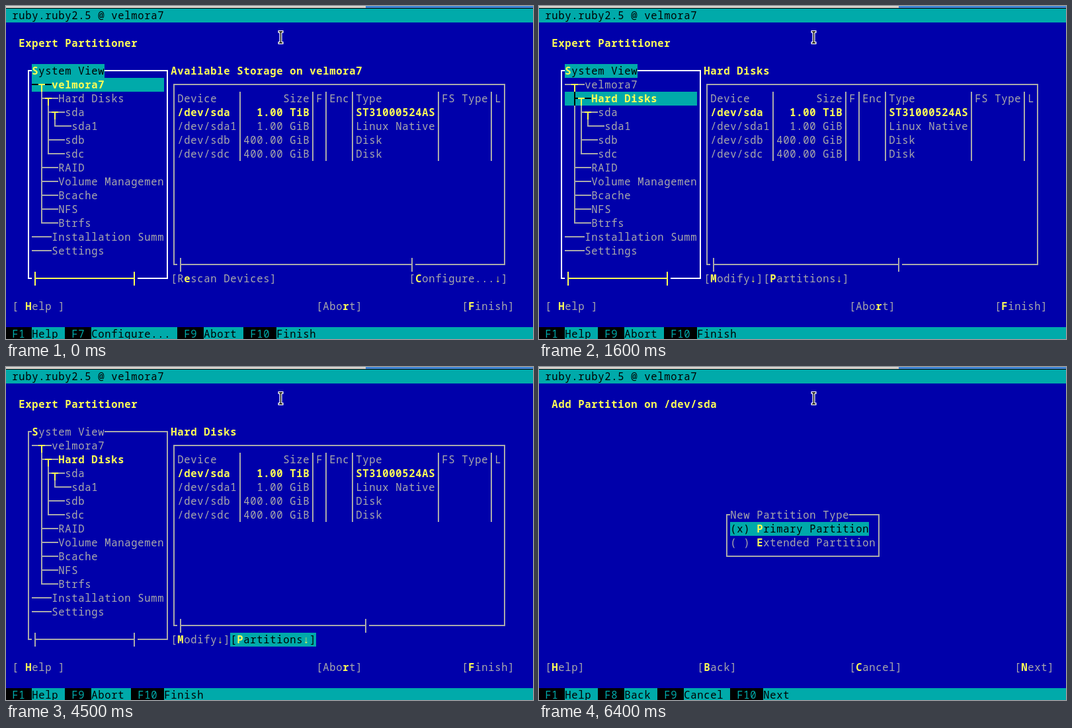
An HTML page with a canvas that plays this animation: 797x505 px, repeating every 8 s.

```html
<!DOCTYPE html>
<html lang="en">
<head>
<meta charset="utf-8">
<title>Partitioner</title>
<style>
  html, body { margin: 0; height: 100%; overflow: hidden; background: #0000aa; }
  canvas { display: block; }
</style>
</head>
<body>
<canvas id="screen" width="797" height="505"></canvas>
<script>
const ctx = document.getElementById('screen').getContext('2d');
const BLUE = '#0000aa', CYAN = '#00aaaa', GRAY = '#aaaaaa';
const YELLOW = '#ffff55', WHITE = '#ffffff', BLACK = '#000000';
const CELL_W = 10, CELL_H = 21, LOOP = 8000;
const FONT = '15.5px "Noto Sans Mono", monospace';
const HOST = 'velmora7';

// Arms of each line-drawing character: left, right, up, down
const ARMS = {
  '─': 'lr', '│': 'ud', '┌': 'rd', '┐': 'ld', '└': 'ru', '┘': 'lu',
  '├': 'rud', '┤': 'lud', '┬': 'lrd'
};

const colX = col => col * CELL_W - 1;
const rowY = row => row * CELL_H + 4;

function fill(col, row, cols, rows, color) {
  ctx.fillStyle = color;
  ctx.fillRect(colX(col), rowY(row), cols * CELL_W, rows * CELL_H);
}

function lineChar(col, row, char) {
  const x = colX(col), y = rowY(row);
  for (const arm of ARMS[char]) {
    if (arm === 'l') ctx.fillRect(x, y + 9, 6, 2);
    if (arm === 'r') ctx.fillRect(x + 4, y + 9, 6, 2);
    if (arm === 'u') ctx.fillRect(x + 4, y, 2, 11);
    if (arm === 'd') ctx.fillRect(x + 4, y + 9, 2, 12);
  }
}

// Writes text on the grid; parts in {braces} are bold yellow
function put(col, row, text, color = GRAY, back) {
  if (back) fill(col, row, text.replace(/[{}]/g, '').length, 1, back);
  text.split(/[{}]/).forEach((part, i) => {
    const bold = i % 2 === 1;
    ctx.fillStyle = bold ? YELLOW : color;
    ctx.font = (bold ? 'bold ' : '') + FONT;
    ctx.letterSpacing = '0px';
    const gap = CELL_W - ctx.measureText('0').width;
    ctx.letterSpacing = gap + 'px';
    for (const [run] of part.matchAll(/[─-┼]|[^─-┼]+/g)) {
      if (ARMS[run]) lineChar(col, row, run);
      else ctx.fillText(run, colX(col) + gap / 2, rowY(row) + 16);
      col += run.length;
    }
  });
}

function frame(c1, r1, c2, r2, color, skip = 0) {
  const width = c2 - c1 - 1;
  put(c1, r1, '┌' + ' '.repeat(skip) + '─'.repeat(width - skip) + '┐', color);
  for (let r = r1 + 1; r < r2; r++) {
    put(c1, r, '│', color);
    put(c2, r, '│', color);
  }
  put(c1, r2, '└', color);
  put(c2, r2, '┘', color);
}

// Bottom edge of a pane with its horizontal scroll bar
function scrollEdge(c1, c2, row, end, focused) {
  const bar = '├' + '─'.repeat(end - c1 - 2) + '┤';
  put(c1 + 1, row, bar, focused ? YELLOW : GRAY);
  put(end + 1, row, '─'.repeat(c2 - end - 1), focused ? WHITE : GRAY);
}

const TREE = [
  ['─{┬}─', HOST], [' ├{┬}─', 'Hard Disks'], [' │├{┬}─', 'sda'],
  [' ││└──', 'sda1'], [' │├──', 'sdb'], [' │└──', 'sdc'],
  [' ├──', 'RAID'], [' ├──', 'Volume Managemen'], [' ├──', 'Bcache'],
  [' ├──', 'NFS'], [' └──', 'Btrfs'],
  ['───', 'Installation Summ'], ['───', 'Settings']
];

function drawTree(selected, focused) {
  frame(3, 4, 24, 19, focused ? WHITE : GRAY, 11);
  scrollEdge(3, 24, 19, 19, focused);
  put(4, 4, '{S}ystem View', focused ? BLACK : GRAY, focused && CYAN);
  TREE.forEach(([branch, name], i) => {
    const current = i === selected, lit = current && focused;
    if (lit) fill(4, 5 + i, 20, 1, CYAN);
    put(4, 5 + i, branch + (current ? `{${name}}` : name), lit ? BLACK : GRAY);
  });
}

const DEVICES = [
  ['/dev/sda', '1.00 TiB', 'ST31000524AS'],
  ['/dev/sda1', '1.00 GiB', 'Linux Native'],
  ['/dev/sdb', '400.00 GiB', 'Disk'],
  ['/dev/sdc', '400.00 GiB', 'Disk']
];

function drawTable(barEnd, focused) {
  frame(25, 5, 75, 18, focused ? WHITE : GRAY);
  scrollEdge(25, 75, 18, barEnd, focused);
  put(26, 6, 'Device   │      Size│F│Enc│Type        │FS Type│L');
  DEVICES.forEach(([device, size, type], i) => {
    const cells = [device.padEnd(9), size.padStart(10), ' ', '   ',
                   type.padEnd(12), '       ', ' '];
    const lit = focused && i === 0;
    const line = cells.map(cell => i ? cell : `{${cell}}`).join('│');
    put(26, 7 + i, line, lit ? BLACK : GRAY, lit && CYAN);
  });
}

function button(col, row, label, focused) {
  put(col, row, `[${label}]`, focused ? BLACK : GRAY, focused && CYAN);
}

function drawKeys(keys) {
  let col = 0;
  for (const [key, label] of keys) {
    put(col, 23, ` ${key} `, CYAN, BLACK);
    col += key.length + 2;
    put(col, 23, label, BLACK);
    col += label.length + 1;
  }
}

function drawMenu(selected) {
  fill(72, 18, 1, 5, BLACK);
  fill(34, 17, 38, 6, CYAN);
  frame(34, 17, 71, 22, WHITE);
  put(35, 22, '─'.repeat(36), WHITE);
  ['Edit Partitions...', 'Add Partition...', 'Delete Partitions...',
   'Clone Partitions to Other Devices...'].forEach((item, i) => {
    if (i === selected) put(35, 18 + i, `{${item.padEnd(36)}}`, BLACK, BLUE);
    else put(35, 18 + i, `{${item[0]}}${item.slice(1)}`, BLACK);
  });
}

function drawPartitioner({ item = 1, focus, overview, menu }) {
  put(2, 2, '{Expert Partitioner}');
  drawTree(item, focus === 'tree');
  put(25, 4, overview ? `{Available Storage on ${HOST}}` : '{Hard Disks}');
  drawTable(overview ? 61 : 54, focus === 'table');
  if (overview) {
    button(25, 19, 'R{e}scan Devices');
    button(61, 19, '{C}onfigure...{↓}');
  } else {
    button(25, 19, '{M}odify{↓}', focus === 'modify');
    button(34, 19, '{P}artitions{↓}', focus === 'partitions');
  }
  button(1, 21, ' {H}elp ');
  button(47, 21, 'Abo{r}t');
  button(69, 21, '{F}inish');
  if (menu !== undefined) return drawMenu(menu);
  drawKeys([['F1', 'Help'], ...(overview ? [['F7', 'Configure...']] : []),
            ['F9', 'Abort'], ['F10', 'Finish']]);
}

function drawWizard() {
  put(2, 2, '{Add Partition on /dev/sda}');
  frame(28, 10, 51, 13, GRAY, 18);
  put(29, 13, '─'.repeat(22));
  put(29, 10, 'New Partition Type');
  put(29, 11, '(x) {P}rimary Partition', BLACK, CYAN);
  put(29, 12, '( ) {E}xtended Partition');
  button(1, 21, '{H}elp');
  button(24, 21, '{B}ack');
  button(47, 21, '{C}ancel');
  button(72, 21, '{N}ext');
  drawKeys([['F1', 'Help'], ['F8', 'Back'], ['F9', 'Cancel'], ['F10', 'Next']]);
}

function drawPointer() {
  for (const [color, width] of [[WHITE, 4], [BLACK, 1.4]]) {
    ctx.strokeStyle = color;
    ctx.lineWidth = width;
    ctx.lineCap = 'square';
    ctx.beginPath();
    for (const y of [39, 56]) {
      ctx.moveTo(413.5, y);
      ctx.lineTo(417.5, y);
    }
    ctx.moveTo(415.5, 39);
    ctx.lineTo(415.5, 56);
    ctx.stroke();
  }
}

const STEPS = [
  [0, { item: 0, focus: 'tree', overview: true }],
  [1000, { focus: 'tree', overview: true }],
  [1500, {}],
  [1600, { focus: 'tree' }],
  [3100, { focus: 'table' }],
  [3500, { focus: 'modify' }],
  [4500, { focus: 'partitions' }],
  [4900, { menu: 0 }],
  [5800, { menu: 1 }],
  [6400, { wizard: true }]
];

function draw(time) {
  const [, state] = STEPS.findLast(([start]) => time >= start);
  ctx.fillStyle = BLUE;
  ctx.fillRect(0, 0, 797, 505);
  ctx.fillStyle = BLACK;
  ctx.fillRect(0, 3, 797, 1);
  ctx.fillStyle = '#d6d3ce';
  ctx.fillRect(0, 0, 544, 3);
  ctx.fillStyle = '#3f87d6';
  ctx.fillRect(544, 0, 253, 3);
  fill(0, 0, 80, 1, CYAN);
  fill(0, 23, 80, 1, CYAN);
  put(1, 0, `ruby.ruby2.5 @ ${HOST}`, BLACK);
  if (state.wizard) drawWizard();
  else drawPartitioner(state);
  drawPointer();
}

const startTime = performance.now();
function tick() {
  draw(Math.max(0, performance.now() - startTime) % LOOP);
  requestAnimationFrame(tick);
}
tick();
</script>
</body>
</html>
```
